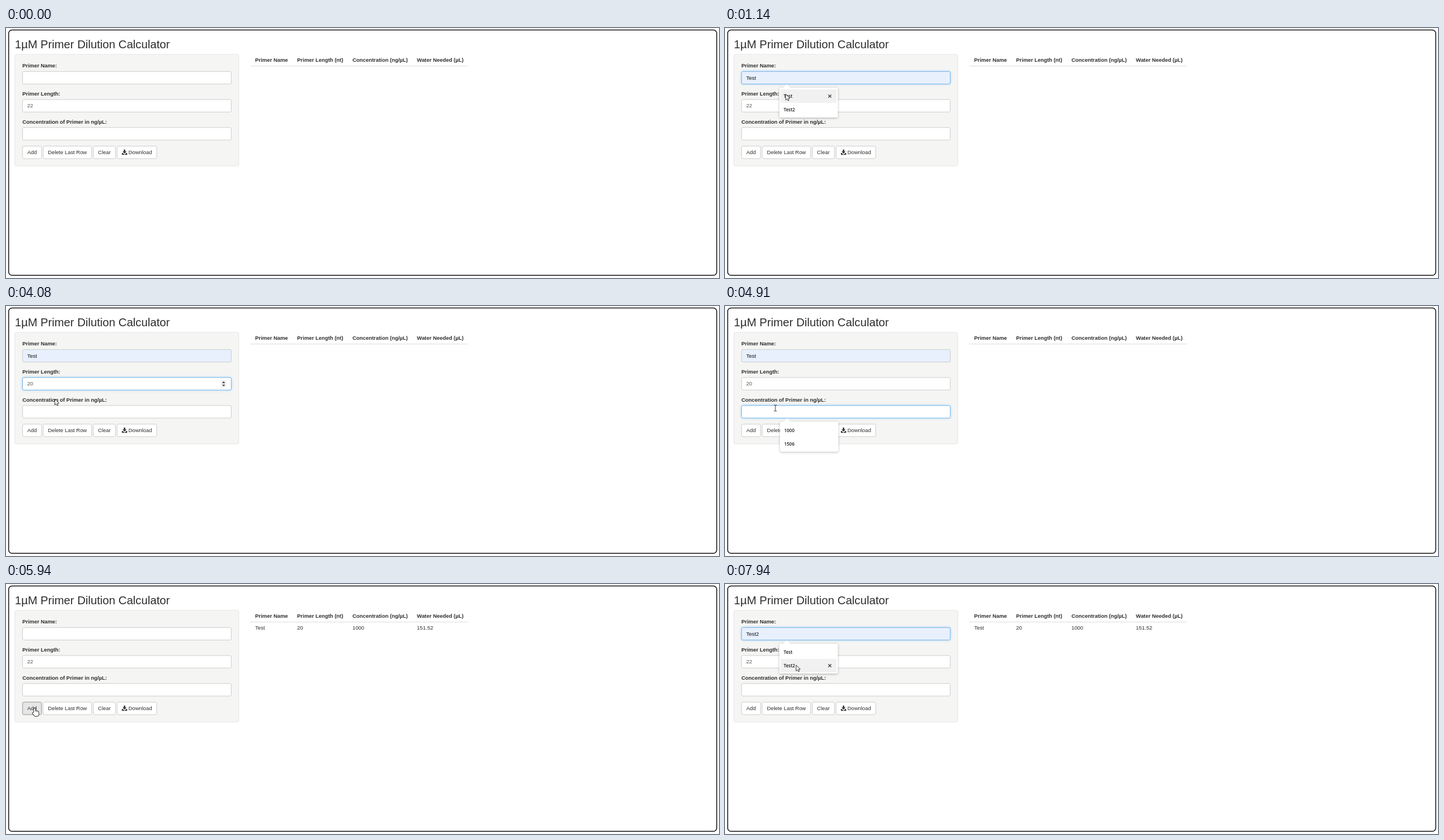
These frames come from a looping animation (1262 by 444 pixels, 8 s). An HTML page with a canvas:

```html
<!DOCTYPE html>
<html lang="en">
<head>
<meta charset="utf-8">
<title>Primer Dilution Calculator</title>
<style>
  html, body { margin: 0; width: 100%; height: 100%; overflow: hidden; background: #fff; }
  canvas { display: block; width: 1262px; height: 444px; }
</style>
</head>
<body>
<canvas id="stage" width="1262" height="444"></canvas>
<script>
const ctx = document.getElementById('stage').getContext('2d');
const LOOP = 8000;
const SANS = '"Liberation Sans", Arial, sans-serif';
const BODY = '9.42px ' + SANS;
const BOLD = 'bold ' + BODY;
const MENU = '600 8px "Open Sans", sans-serif';
const INK = '#2d2d2d';
const ADDED = 5850;

const LABELS = ['Primer Name:', 'Primer Length:', 'Concentration of Primer in ng/µL:'];
const BUTTONS = ['Add', 'Delete Last Row', 'Clear', 'Download'];
const TABLE = [
  ['Primer Name', 'Test'],
  ['Primer Length (nt)', '20'],
  ['Concentration (ng/µL)', '1000'],
  ['Water Needed (µL)', '151.52']
];

// Each move starts where the last one ended; bend bows the path sideways
const ENTRY = { x: 150, y: 6 };
const MOVES = [
  { start: 60, end: 520, x: 95.5, y: 89.5, bend: 0 },
  { start: 870, end: 1140, x: 107, y: 117, bend: 0 },
  { start: 1440, end: 1760, x: 88, y: 139, bend: 0 },
  { start: 3960, end: 4230, x: 89, y: 181, bend: 0.13 },
  { start: 4910, end: 5200, x: 110, y: 216, bend: 0 },
  { start: 5400, end: 5570, x: 50, y: 221, bend: -0.17 },
  { start: 6240, end: 6650, x: 559.5, y: 129.5, bend: 0.24 },
  { start: 6850, end: 7340, x: 100, y: 90, bend: 0.04 },
  { start: 7670, end: 7940, x: 125.5, y: 143.5, bend: 0 }
];

const MENUS = [
  { field: 0, open: 540, close: 1440, items: ['Test', 'Test2'] },
  { field: 2, open: 4410, close: 5400, items: ['1000', '1506'] },
  { field: 0, open: 7510, close: LOOP, items: ['Test', 'Test2'] }
];

const FOCUS = [
  { field: 0, from: 530, to: 1960 },
  { field: 1, from: 1960, to: 4400 },
  { field: 2, from: 4400, to: 5700 },
  { field: 0, from: 7490, to: LOOP }
];

const clamp = v => Math.max(0, Math.min(1, v));
const during = (t, a, b) => t >= a && t < b;
const mix = (a, b, k) => 'rgb(' + a.map((v, i) => Math.round(v + (b[i] - v) * k)) + ')';
const fieldY = i => 88.3 + 49.75 * i;
const menuX = m => 96 + m.field / 2;

function width(str, font) {
  ctx.font = font;
  return ctx.measureText(str).width;
}

function text(str, x, mid, font = BODY, color = INK) {
  ctx.font = font;
  ctx.fillStyle = color;
  ctx.fillText(str, x, mid + 3.4);
}

function box(x, y, w, h, r, fill, stroke, line = 0.9) {
  ctx.beginPath();
  ctx.roundRect(x, y, w, h, r);
  if (fill) { ctx.fillStyle = fill; ctx.fill(); }
  if (stroke) { ctx.strokeStyle = stroke; ctx.lineWidth = line; ctx.stroke(); }
}

function poly(points, closed) {
  ctx.beginPath();
  for (let i = 0; i < points.length; i += 2) ctx.lineTo(points[i], points[i + 1]);
  if (closed) ctx.closePath();
}

function triangle(x, y, half, rise, color) {
  ctx.fillStyle = color;
  poly([x - half, y, x, y - rise, x + half, y], true);
  ctx.fill();
}

function glow(color, blur, y = 0) {
  ctx.shadowColor = color;
  ctx.shadowBlur = blur;
  ctx.shadowOffsetY = y;
}

function layoutButtons() {
  let x = 29.3;
  return BUTTONS.map(label => {
    const icon = label === 'Download' ? 11.6 : 0;
    const b = { label, x, icon, w: width(label, BODY) + icon + 16.8 };
    x += b.w + 2.9;
    return b;
  });
}

function pointerAt(t) {
  if (t < MOVES[0].start) return null;
  let p = ENTRY;
  for (const m of MOVES) {
    if (t < m.start) break;
    const u = 1 - Math.pow(1 - clamp((t - m.start) / (m.end - m.start)), 1.6);
    const dx = m.x - p.x, dy = m.y - p.y, bow = 2 * u * (1 - u) * m.bend;
    p = { x: p.x + dx * u - dy * bow, y: p.y + dy * u + dx * bow };
  }
  return p;
}

function hoveredRow(menu, p) {
  const dx = p.x - menuX(menu), dy = p.y - fieldY(menu.field);
  if (dx < 0 || dx > 103 || dy < 19 || dy > 70) return -1;
  return dy < 45 ? 0 : 1;
}

const overField = (p, i) => p && p.x > 29 && p.x < 399 && Math.abs(p.y - fieldY(i)) < 11.5;
const overButton = (p, b) => p && p.x >= b.x && p.x <= b.x + b.w && p.y > 209 && p.y < 232;

function focusAmount(t, field) {
  let k = 0;
  for (const f of FOCUS)
    if (f.field === field && t >= f.from)
      k = t < f.to ? clamp((t - f.from) / 140) : 1 - clamp((t - f.to) / 140);
  return k;
}

function fieldStates(t, preview) {
  const s = [{ value: '' }, { value: '22' }, { value: '' }];
  if (during(t, 1440, ADDED)) s[0] = { value: 'Test', auto: true };
  if (during(t, 3070, ADDED)) s[1].value = t < 3160 ? '2' : '20';
  if (during(t, 5400, ADDED)) s[2] = { value: '1000', auto: true };
  if (preview) s[preview.field] = { value: preview.value, auto: true, preview: true };
  return s;
}

// Blinking restarts with each edit
function caretOn(t, field) {
  const span = FOCUS.find(f => f.field === field && during(t, f.from, f.to));
  if (!span) return false;
  const start = [span.from + 10, 1440, 3170, 5400].filter(v => v <= t && v >= span.from).pop();
  return start !== undefined && Math.floor((t - start) / 500) % 2 === 0;
}

function drawField(t, i, s, spinner) {
  const mid = fieldY(i), k = focusAmount(t, i);
  const shape = [29.3, mid - 11, 369.4, 22.2, 2.5];
  if (k > 0) glow(`rgba(102,175,233,${0.6 * k})`, 4.5);
  box(...shape, s.auto ? '#e8f0fe' : '#fff');
  glow('transparent', 0);
  box(...shape, null, mix([200, 200, 200], [102, 175, 233], k));
  text(s.value, 37.5, mid, BODY, s.auto ? '#111' : '#555');
  if (!s.preview && caretOn(t, i)) {
    ctx.fillStyle = '#444';
    ctx.fillRect(Math.round(37.5 + width(s.value, BODY)), mid - 5.5, 0.9, 11);
  }
  if (spinner) {
    box(380, mid - 6.5, 10, 13, 0, '#f1f1f1');
    triangle(385.2, mid - 1, 2.8, 3.2, '#444');
    triangle(385.2, mid + 1.6, 2.8, -3.2, '#444');
  }
}

function drawButton(b, t, p, covered) {
  const pressed = b.label === 'Add' && during(t, 5700, 7490);
  const hot = pressed || (!covered && overButton(p, b));
  box(b.x, 209.8, b.w, 22.2, 2.5, hot ? '#e6e6e6' : '#fff', pressed ? '#8c8c8c' : hot ? '#adadad' : '#c8c8c8');
  text(b.label, b.x + 8.4 + b.icon, 220.7);
  if (!b.icon) return;
  const cx = b.x + 13.2;
  ctx.fillStyle = INK;
  ctx.fillRect(cx - 1.3, 216, 2.6, 3.6);
  ctx.fillRect(cx - 4.6, 221.8, 9.2, 3.4);
  triangle(cx, 220.8, 4.6, -4.2, '#fff');
  triangle(cx, 219.2, 3.6, -3.8, INK);
}

function drawMenu(m, t, row) {
  const alpha = t < m.close ? clamp((t - m.open) / 100) : 1 - clamp((t - m.close) / 170);
  if (t < m.open || alpha <= 0) return;
  const mid = fieldY(m.field), x = menuX(m);
  const shape = [x + 0.5, mid + 17.7, 103, 53, 3];
  ctx.save();
  ctx.globalAlpha = alpha;

  // Shadow only outside the panel, so it stays white while fading
  ctx.save();
  ctx.beginPath();
  ctx.rect(0, 0, 1262, 444);
  ctx.roundRect(...shape);
  ctx.clip('evenodd');
  glow('rgba(0,0,0,.3)', 4, 1);
  box(...shape, '#fff');
  ctx.restore();

  box(...shape, '#fff');
  triangle(x + 13.2, mid + 17.8, 6.2, 6, '#fff');
  m.items.forEach((item, i) => {
    const y = mid + 32.7 + 24 * i;
    if (i === row) {
      box(x + 2, y - 12, 99.5, 24, 2, '#f1f1f1');
      ctx.strokeStyle = '#222';
      ctx.lineWidth = 1.2;
      for (const d of [-2.7, 2.7]) {
        poly([x + 89.5 - d, y - 2.7, x + 89.5 + d, y + 2.7]);
        ctx.stroke();
      }
    }
    text(item, x + 7.7, y - 0.4, MENU, '#1c1c1c');
  });
  ctx.restore();
}

function drawBeam() {
  poly([0, -4.6, 0, 4.9]);
  ctx.stroke();
  for (const [end, stem] of [[-5.2, -4.6], [5.5, 4.9]]) {
    poly([-2.6, end, -0.7, end, 0, stem, 0.7, end, 2.6, end]);
    ctx.stroke();
  }
}

function drawHand() {
  const parts = [[-0.5, -0.3, 2.4, 9, 1.2], [-2.8, 7.2, 5, 3.4, 1.5], [-0.5, 5, 8.2, 8.6, 2.8]];
  parts.forEach(r => box(...r, null, '#222', 1.8));
  parts.forEach(r => box(...r, '#fff'));
}

function drawArrow() {
  poly([0.4, 0.4, 0.4, 11, 2.8, 8.8, 4.5, 12.2, 6.3, 11.3, 4.7, 8.1, 7.8, 7.8], true);
  ctx.fill();
  ctx.stroke();
}

function drawPointer(p, paint) {
  ctx.save();
  ctx.translate(p.x, p.y);
  ctx.strokeStyle = '#222';
  ctx.fillStyle = '#fff';
  ctx.lineWidth = 0.9;
  ctx.lineJoin = 'round';
  paint();
  ctx.restore();
}

function drawTable(filled) {
  let x = 441;
  for (const [head, cell] of TABLE) {
    text(head, x, 56.6, BOLD);
    if (filled) text(cell, x, 78);
    x += width(head, BOLD) + 16.3;
  }
  ctx.fillStyle = '#ddd';
  ctx.fillRect(432, 67, 385.5, 1);
}

function draw(t) {
  const p = pointerAt(t);
  const buttons = layoutButtons();
  const menu = MENUS.find(m => during(t, m.open, m.close));
  const row = menu ? hoveredRow(menu, p) : -1;
  const free = row < 0;
  const states = fieldStates(t, free ? null : { field: menu.field, value: menu.items[row] });

  ctx.fillStyle = '#fff';
  ctx.fillRect(0, 0, 1262, 444);
  box(4.7, 3.5, 1253.3, 435.7, 6, '#fff', '#111', 1.5);
  text('1µM Primer Dilution Calculator', 15.8, 32.2, '20.2px ' + SANS);
  box(15.7, 46.9, 396.3, 198.1, 2.7, '#f5f5f4', '#e3e3e3');

  LABELS.forEach((label, i) => {
    const spinner = i === 1 && (during(t, 1960, 4400) || (free && overField(p, 1)));
    text(label, 29, fieldY(i) - 21.7, BOLD);
    drawField(t, i, states[i], spinner);
  });
  buttons.forEach(b => drawButton(b, t, p, !free));
  drawTable(t >= ADDED);
  MENUS.forEach(m => drawMenu(m, t, m === menu ? row : t >= m.close ? 0 : -1));

  if (p) {
    const beam = free && LABELS.some((_, i) => overField(p, i));
    const hand = free && buttons.some(b => overButton(p, b));
    drawPointer(p, beam ? drawBeam : hand ? drawHand : drawArrow);
  }
}

const begin = performance.now();
function tick() {
  draw((performance.now() - begin) % LOOP);
  requestAnimationFrame(tick);
}
tick();
</script>
</body>
</html>
```
